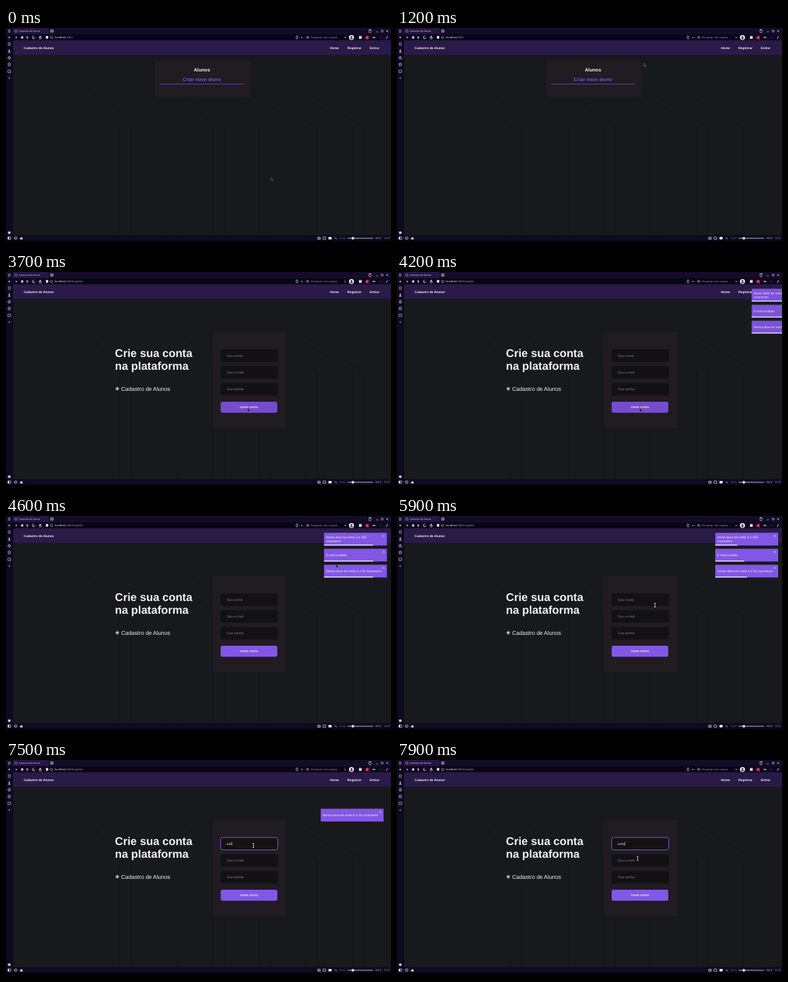
Write an HTML page with a canvas that moves like this. It is 600 px wide and 338 px high and loops after 8000 ms.

```html
<!DOCTYPE html>
<html lang="pt">
<head>
<meta charset="utf-8">
<title>Cadastro de Alunos</title>
<style>
html, body { margin: 0; width: 100%; height: 100%; overflow: hidden; background: #000; }
canvas { display: block; width: 600px; height: 338px; }
</style>
</head>
<body>
<canvas id="stage"></canvas>
<script>
const W = 600, H = 338, LOOP = 8000, STEP = 100;
const canvas = document.getElementById('stage');
const ctx = canvas.getContext('2d');
const dpr = window.devicePixelRatio || 1;
canvas.width = W * dpr;
canvas.height = H * dpr;

const PAGE = '"Liberation Sans", Arial, sans-serif';
const UI = '"Noto Sans", "Open Sans", sans-serif';
const PURPLE = '#8257e5', WHITE = '#f4f2f6', PALE = '#d6d2de', DIM = '#a39ab2';
const CHROME = '#0e0820', FIELD = '#090418', CARD = '#201c22';
const APP = 'Cadastro de Alunos', NAME = 'Lirto';

const PAGE_AT = 2800, TOAST_AT = 3945, HOVER_AT = 4600, FOCUS_AT = 6600;
const TYPE_AT = 6950, TYPE_GAP = 150;
const TOAST_LIFE = 3000, TOAST_ANIM = 700;
const PX = 0.3125; // stage pixels per CSS pixel

// ---- shapes ----
function rect(x, y, w, h, color, r = 0) {
  ctx.fillStyle = color;
  ctx.beginPath();
  ctx.roundRect(x, y, w, h, r);
  ctx.fill();
}
function frame(x, y, w, h, color = PALE, r = 0.4, lw = 0.7) {
  ctx.strokeStyle = color;
  ctx.lineWidth = lw;
  ctx.beginPath();
  ctx.roundRect(x, y, w, h, r);
  ctx.stroke();
}
function line(color, lw, ...points) {
  ctx.strokeStyle = color;
  ctx.lineWidth = lw;
  ctx.beginPath();
  for (let i = 0; i < points.length; i += 2) ctx.lineTo(points[i], points[i + 1]);
  ctx.stroke();
}
function disc(x, y, r, color) {
  ctx.fillStyle = color;
  ctx.beginPath();
  ctx.arc(x, y, r, 0, Math.PI * 2);
  ctx.fill();
}
function ring(x, y, r, color = PALE, end = Math.PI * 2) {
  ctx.strokeStyle = color;
  ctx.lineWidth = 0.8;
  ctx.beginPath();
  ctx.arc(x, y, r, 0, end);
  ctx.stroke();
}
// n crossed strokes around a point
function spokes(x, y, r, n, color = PALE, turn = 0, lw = 0.8) {
  for (let i = 0; i < n; i++) {
    const a = turn + i * Math.PI / n, dx = r * Math.cos(a), dy = r * Math.sin(a);
    line(color, lw, x - dx, y - dy, x + dx, y + dy);
  }
}
const plus = (x, y, r, color) => spokes(x, y, r, 2, color);
const cross = (x, y, r, color) => spokes(x, y, r, 2, color, Math.PI / 4);
const chevron = (x, y, dx, dy, color = WHITE) =>
  line(color, 0.9, x - dx - dy, y - dy - dx, x + dx, y + dy, x - dx + dy, y - dy + dx);
const caret = (x, y) => chevron(x, y, 0, 0.7, PALE);

function text(s, x, y, size, color, { font = PAGE, bold = false, align = 'left' } = {}) {
  ctx.font = `${bold ? 'bold ' : ''}${size}px ${font}`;
  ctx.fillStyle = color;
  ctx.textAlign = align;
  ctx.fillText(s, x, y);
  return x + ctx.measureText(s).width;
}
const label = (s, x, y, size, color) => text(s, x, y, size, color, { font: UI });

// ---- timing ----
function bezier(x1, y1, x2, y2) {
  const at = (a, b, s) => 3 * a * s * (1 - s) ** 2 + 3 * b * s * s * (1 - s) + s ** 3;
  return x => {
    let lo = 0, hi = 1;
    for (let i = 0; i < 24; i++) {
      const mid = (lo + hi) / 2;
      if (at(x1, x2, mid) < x) lo = mid; else hi = mid;
    }
    return at(y1, y2, lo);
  };
}
const bounce = bezier(0.215, 0.61, 0.355, 1);
const ease = bezier(0.25, 0.1, 0.25, 1);
const smooth = k => k * k * (3 - 2 * k);
const clamp = (v, lo, hi) => Math.min(hi, Math.max(lo, v));

// keys: [time, ...values]
function track(keys, t, curve) {
  const i = keys.findIndex(key => key[0] > t);
  if (i < 1) return keys.at(i && -1).slice(1);
  const [t0, ...from] = keys[i - 1], [t1, ...to] = keys[i];
  const k = curve((t - t0) / (t1 - t0));
  return from.map((v, j) => v + (to[j] - v) * k);
}

// ---- browser window ----
function drawTabs() {
  const y = 4.8;
  rect(0, 0, W, 10, '#150c29');
  rect(11, 0, 55.5, 10, '#261645');
  for (let i = -1; i < 2; i++) line(PALE, 0.6, 3, y + i * 1.7, 7, y + i * 1.7);
  ring(15.5, y, 1.8, DIM);
  label(APP, 20, 6.3, 3.67, PALE);
  frame(69.3, 2.7, 4.2, 4.2);
  plus(71.4, y, 1.2);
  frame(565.8, 3.3, 3, 4);
  line(PALE, 0.7, 565, 2.6, 569.6, 2.6);
  line(PALE, 0.7, 576.5, 6, 579.5, 6);
  frame(584.8, 3.4, 2.8, 2.8);
  cross(594, y, 1.9);
}

function drawAddressRow(registered) {
  const y = 14.8, base = 16.4;
  rect(0, 9.6, W, 9.6, CHROME);
  chevron(5, y, -1.1, 0);
  chevron(16, y, 1.1, 0, PALE);
  rect(23.6, 13.1, 3.2, 3.4, PALE);
  rect(31.8, 13.1, 2.6, 3.4, DIM);
  ring(43, y, 2, WHITE, 5);
  chevron(53.3, 13.7, 0, -1.2);
  frame(51.8, 14.4, 3, 2.6, WHITE);

  rect(60, 10.6, 405, 8, FIELD, 1);
  rect(62.2, 12.6, 3.6, 4.4, WHITE, [0.5, 0.5, 2, 2]);
  ring(71, y, 1.8, DIM);
  const end = label('localhost', 76, base, 4.1, WHITE);
  label(registered ? ':3000/register' : ':3000', end, base, 4.1, DIM);
  frame(452.2, 12.6, 2.6, 4.2);
  caret(461, y);

  rect(467, 10.6, 65, 8, FIELD, 1);
  ring(470, 14.4, 1.3);
  line(PALE, 0.8, 471, 15.4, 472.3, 16.8);
  label('Pesquisar com Lupavo', 475, base, 3.9, DIM);
  caret(528.5, y);
  disc(538.4, y, 3.9, WHITE);
  disc(538.4, 14, 1.4, '#3a3444');
  rect(536.2, 15.6, 4.4, 2, '#3a3444', 1);
  rect(550, 12.6, 4.4, 4.4, PALE, 0.5);
  rect(560.5, 12.6, 4.6, 4.6, '#d8344a', 0.5);
  rect(571.2, 13.8, 4.4, 2, DIM, 1);
  line('#4a3f5c', 0.7, 581.5, y, 585.5, y);
  line(WHITE, 1, 592, 16.4, 595.4, 13.2);
}

function drawSidebar() {
  const x = 5.1;
  rect(0, 19.2, 11, 305, CHROME);
  frame(x - 1.4, 23, 2.8, 4.2);
  line(PALE, 0.9, x, 33, x, 37);
  chevron(x, 36.3, 0, 1);
  line(PALE, 0.8, x - 2, 38.4, x + 2, 38.4);
  ring(x, 46.7, 2);
  line(PALE, 0.6, x, 45.3, x, 46.8, x + 1.1, 46.8);
  frame(x - 1.7, 55, 3.4, 4.2);
  line(PALE, 0.6, x - 1, 57, x + 1, 57);
  frame(x - 2.2, 66, 4.4, 3.8);
  plus(x, 78.4, 1.4, DIM);
  spokes(x, 320.3, 2.5, 4);
  disc(x, 320.3, 1.8, PALE);
}

function drawStatusBar(link) {
  const y = 329, base = 330.2;
  rect(0, 324, W, 9, '#100922');
  rect(0, 333, W, 5, '#000');
  frame(3, 327, 4.4, 3.6, WHITE);
  rect(3, 327, 1.8, 3.6, WHITE);
  frame(13, 327, 4, 3.4);
  line(PALE, 0.6, 14, y, 16, y);
  disc(24, y, 1.7, PALE);
  line(PALE, 1.4, 21.6, 330, 26.2, 330);
  if (link) label('http://localhost:3000/register', 29.8, base, 3.55, PALE);

  frame(485.6, 327.4, 4.4, 3.2, WHITE);
  disc(487.8, y, 0.8, WHITE);
  frame(494, 327, 4.2, 3.8, WHITE);
  rect(502.6, 327, 4.8, 3.8, WHITE, 0.3);
  line(PALE, 0.9, 512.5, 328, 515.5, 330);
  label('Reset', 520, base, 3.5, '#6f6680');
  line(PALE, 0.9, 532.5, y, 572, y);
  disc(540.5, y, 2, WHITE);
  label('100 %', 575, base, 3.5, PALE);
  label('11:17', 589, base, 3.5, PALE);
}

// ---- web page ----
function drawBackdrop() {
  rect(11, 19, 589, 305, '#18191c');
  const shade = 'rgba(0,0,0,0.16)';
  // pairs of strands that come in slanted and then fall straight down
  for (let x = 177; x < W; x += 72.5) {
    const slant = x > 400 ? 100 : 48;
    for (const strand of [x, x + 18]) line(shade, 0.6, strand - slant, 95, strand, 155, strand, 324);
  }
}

function drawNav(overLink) {
  const bold = { bold: true }, base = 32.5;
  rect(11, 19.2, 589, 22.8, '#2a1a48');
  text(APP, 27.6, base, 5, WHITE, bold);
  text('Home', 505, base, 5, WHITE, bold);
  text('Registrar', 532, base, 5, overLink ? PALE : WHITE, bold);
  text('Entrar', 567, base, 5, WHITE, bold);
}

function drawHome() {
  const title = { bold: true, align: 'center' };
  rect(232, 51.7, 149, 55.3, CARD, 2);
  text('Alunos', 305.4, 67.6, 7.5, WHITE, title);
  text('Criar novo aluno', 305.4, 82.6, 7.5, '#7a50d8', title);
  line('#7048c4', 0.9, 240, 87.8, 371, 87.8);
}

function drawRegister(t, overButton) {
  text('Crie sua conta', 169.8, 133, 17.5, WHITE, { bold: true });
  text('na plataforma', 169.8, 153.2, 17.5, WHITE, { bold: true });
  spokes(173.4, 182.7, 3, 4, WHITE);
  text(APP, 179.5, 185.7, 8.75, WHITE);

  rect(322, 94, 115, 150, CARD, 2.5);
  const typed = NAME.slice(0, Math.max(0, Math.floor((t - TYPE_AT) / TYPE_GAP) + 1));
  ['Seu nome', 'Seu e-mail', 'Sua senha'].forEach((hint, i) => {
    const y = 121 + i * 26.2, filled = i === 0 && typed;
    rect(334.3, y, 89.5, 19.8, '#121214', 3);
    const end = text(filled || hint, 344, y + 11.8, 5.5, filled ? WHITE : '#77747c');
    if (i > 0 || t < FOCUS_AT) return;
    frame(334.5, y + 0.2, 89, 19.4, PURPLE, 3, 1);
    const x = filled ? end + 0.4 : 344;
    line(WHITE, 0.5, x, y + 7, x, y + 13);
  });
  rect(334.5, 203, 88.3, 17.2, overButton ? '#744dcd' : PURPLE, 3);
  text('CRIAR CONTA', 378.7, 213.1, 4.08, WHITE, { bold: true, align: 'center' });
}

// ---- toasts: [share of the animation, CSS shift, opacity] ----
const ENTER = [[0, 3000, 0], [0.6, -25, 1], [0.75, 10, 1], [0.9, -5, 1], [1, 0, 1]];
const LEAVE = [[0, 0, 1], [0.2, -20, 1], [1, 2000, 0]];
const toasts = [
  { lines: ['Nome deve ter entre 3 e 255', 'caracteres'], pause: 0 },
  { lines: ['E-mail inválido'], pause: 330 },
  { lines: ['Senha deve ter entre 6 e 50 caracteres'], pause: 470 }
];

function drawToast({ lines, pause }, i, t) {
  if (t < TOAST_AT) return;
  const age = t - TOAST_AT - clamp(t - HOVER_AT, 0, pause);
  const out = (age - TOAST_LIFE) / TOAST_ANIM;
  if (out >= 1) return;
  const [shift, alpha] = out > 0 ? track(LEAVE, out, ease) : track(ENTER, age / TOAST_ANIM, bounce);

  ctx.save();
  ctx.globalAlpha = alpha;
  ctx.translate(496 + shift * PX, 26.3 + i * 25);
  rect(0, 0, 98, 20, PURPLE, 0.4);
  const top = lines.length > 1 ? 9 : 11.8;
  lines.forEach((s, k) => text(s, 2.8, top + k * 5.8, 5, WHITE));
  cross(92.8, 5, 1.8, '#e4dafa');
  rect(0, 18.4, 98 * Math.max(0, 1 - age / TOAST_LIFE), 1.6, '#efe9fc');
  ctx.restore();
}

// ---- mouse ----
const PATH = [
  [0, 413, 234], [900, 302, 71], [1400, 430, 47], [1500, 430, 47], [2300, 545, 33],
  [PAGE_AT, 545, 33], [3600, 377, 213], [4200, 379, 213], [HOVER_AT, 515, 75],
  [5000, 518, 80], [5900, 402, 139.5], [FOCUS_AT, 385.5, 133.5], [7700, 385.5, 133.5],
  [7900, 375, 154]
];
const within = (x, y, left, top, w, h) => x >= left && x <= left + w && y >= top && y <= top + h;

function drawMouse(x, y, kind) {
  const dark = '#17151b', light = '#c9c6cf';
  ctx.save();
  ctx.translate(x, y);
  if (kind === 'text') {
    line(WHITE, 0.8, 0, -3, 0, 3);
    for (const end of [-3, 3]) line(WHITE, 0.7, -1.4, end, 1.4, end);
  } else if (kind === 'hand') {
    rect(-0.3, 0, 1.2, 4, dark, 0.5);
    rect(-1, 2.2, 4, 3.2, dark, 1);
    frame(-1, 2.2, 4, 3.2, light, 1, 0.4);
  } else {
    line(light, 0.9, 1.2, 3, 2.2, 5);
    ctx.fillStyle = dark;
    line(light, 0.6, 0, 0, 0, 4.4, 3, 3.1, 0, 0);
    ctx.fill();
  }
  ctx.restore();
}

function draw(t) {
  const registered = t >= PAGE_AT;
  const [x, y] = track(PATH, t, smooth);
  const overLink = within(x, y, 530, 25, 26, 11);
  const overButton = registered && within(x, y, 334, 203, 89, 17);
  const overToast = t >= TOAST_AT && within(x, y, 494, 26, 100, 71);
  const overField = registered && within(x, y, 334, 121, 90, 73);
  const kind = overField ? 'text' : overLink || overButton || overToast ? 'hand' : 'arrow';

  ctx.setTransform(dpr, 0, 0, dpr, 0, 0);
  ctx.textRendering = 'geometricPrecision';
  drawBackdrop();
  drawNav(overLink);
  if (registered) drawRegister(t, overButton); else drawHome();
  toasts.forEach((toast, i) => drawToast(toast, i, t));
  drawTabs();
  drawAddressRow(registered);
  drawSidebar();
  drawStatusBar(overLink);
  drawMouse(x, y, kind);
}

const start = performance.now();
function tick() {
  const t = (performance.now() - start) % LOOP;
  draw(Math.floor(t / STEP) * STEP);
  requestAnimationFrame(tick);
}
tick();
</script>
</body>
</html>
```
